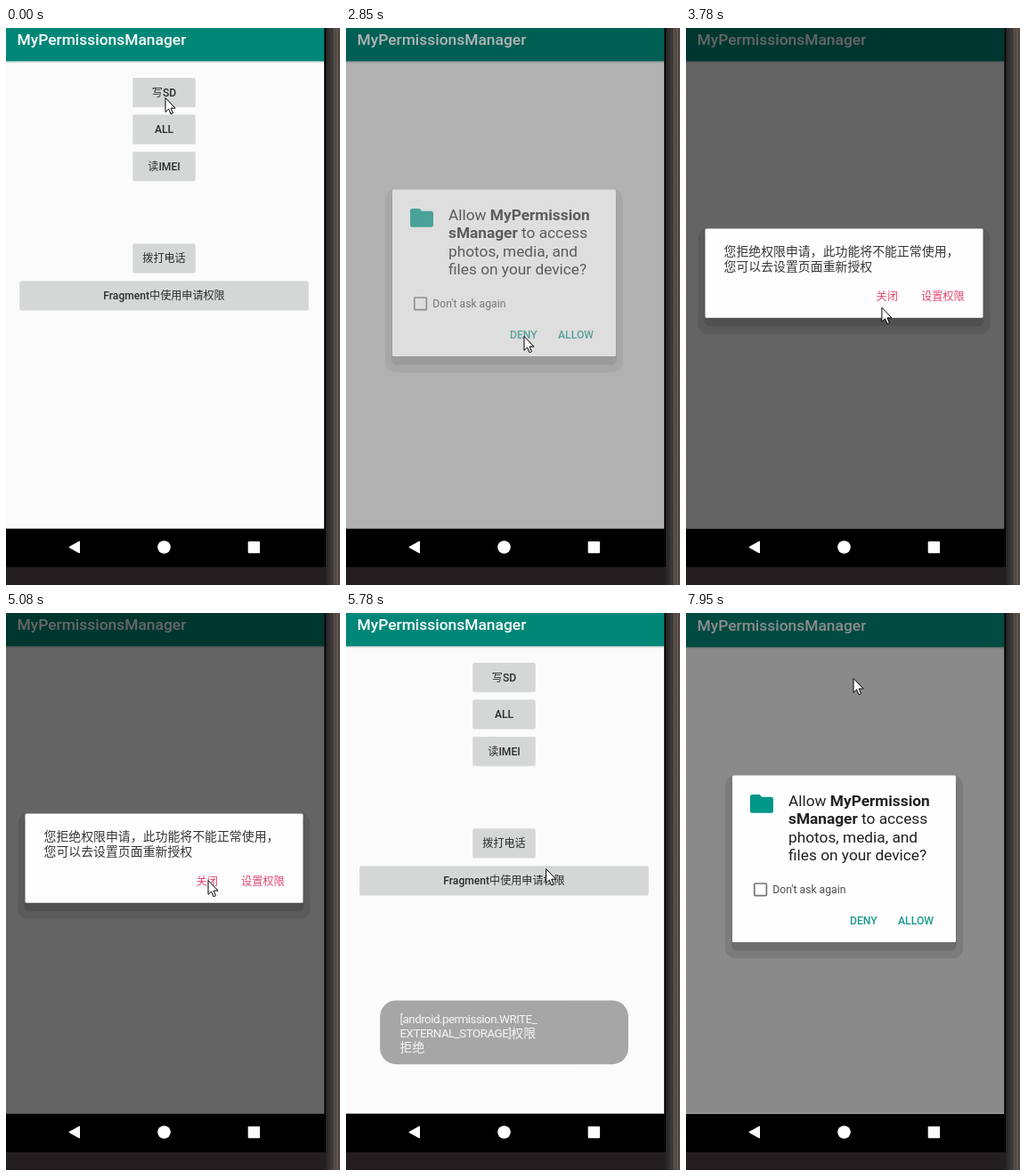
An HTML page that plays this animation: 375x626 px, repeating every 8 s.

```html
<!DOCTYPE html>
<html lang="zh-CN">
<head>
<meta charset="utf-8">
<title>Permission dialogs</title>
<style>
  html, body { margin: 0; width: 100%; height: 100%; overflow: hidden; background: #231f20; }
  svg { display: block; width: 100%; height: 100%; }
  text { font-family: Roboto, 'Noto Sans CJK SC', 'Noto Sans CJK', sans-serif; white-space: pre; }
  .cjk { font-weight: 400; }
  .mid { text-anchor: middle; }
  .toast { letter-spacing: -.52px; }
  .toast .cjk { font-size: 13.9px; letter-spacing: 0; }
</style>
</head>
<body>
<svg id="stage" viewBox="0 0 375 626" preserveAspectRatio="none"></svg>
<script>
const rect = (x, y, w, h, fill, r = 0, extra = '') =>
  `<rect x="${x}" y="${y}" width="${w}" height="${h}" rx="${r}" fill="${fill}" ${extra}/>`;

const text = (x, y, size, fill, str, weight = 400, extra = '') =>
  `<text x="${x}" y="${y}" font-size="${size}" fill="${fill}" font-weight="${weight}" ${extra}>` +
  str.replace(/[\u4e00-\u9fff\uff0c]+/g, s => `<tspan class="cjk">${s}</tspan>`) + '</text>';

const lines = (x, y, step, size, fill, rows, extra) =>
  rows.map((row, i) => text(x, y + i * step, size, fill, row, 400, extra)).join('');

const bold = s => `<tspan font-weight="700">${s}</tspan>`;

const button = (x, y, w, label) =>
  rect(x - .5, y, w + 1, 33.3, '#000', 2, 'opacity=".08"') +
  rect(x, y, w, 32.5, '#d5d7d6', 1.5) +
  text(x + w / 2, y + 20.5, 12.1, '#2b2d2c', label, 500, 'class="mid"');

// Stepped shadow with the white card on top
const card = (x, y, w, h) =>
  rect(x - 8, y, w + 16, h + 18, '#000', 11, 'opacity=".1"') +
  rect(x - 1, y + 3, w + 2, h + 6.5, '#000', 6, 'opacity=".12"') +
  rect(x, y, w, h, '#fefefe', 1.5);

const page =
  rect(0, 0, 357.5, 562.6, '#fafbfa') +
  rect(0, 37, 357.5, 2.2, '#000', 0, 'opacity=".1"') +
  rect(0, -4, 357.5, 41.4, '#008778') +
  text(12.5, 19, 17.4, '#fff', 'MyPermissionsManager', 500);

const buttons =
  ['写SD', 'ALL', '读IMEI'].map((s, i) => button(142.5, 56 + i * 41.6, 70, s)).join('') +
  button(142.5, 242.5, 70, '拨打电话') +
  button(15.5, 284.5, 324, 'Fragment中使用申请权限') +
  '<g clip-path="url(#btn)"><circle id="ripple" cx="182" cy="76" opacity=".1"/></g>';

const ask = card(52, 181.5, 251, 187.5) +
  '<path d="M74.5 203h8l2.8 2.8h10.2q2.5 0 2.5 2.5v13q0 2.5-2.5 2.5h-21q-2.5 0-2.5-2.5v-15.8q0-2.5 2.5-2.5z" fill="#009688"/>' +
  lines(115, 216, 20.4, 17.3, '#212121', [`Allow ${bold('MyPermission')}`,
    `${bold('sManager')} to access`, 'photos, media, and', 'files on your device?']) +
  rect(76.8, 303, 13.6, 13.6, 'none', 1, 'stroke="#757575" stroke-width="1.7"') +
  text(97.3, 314.3, 12.2, '#4c4c4c', "Don't ask again") +
  text(184, 349.3, 12.2, '#1a998b', 'DENY', 500) +
  text(238, 349.3, 12.2, '#1a998b', 'ALLOW', 500);

const denied = card(21.5, 225.5, 312, 100.2) +
  lines(42.5, 256, 16.5, 13.9, '#363636',
    ['您拒绝权限申请，此功能将不能正常使用，', '您可以去设置页面重新授权']) +
  text(213.5, 305.7, 12.2, '#e2476f', '关闭') +
  text(264, 305.7, 12.2, '#e2476f', '设置权限');

const toast = rect(38.2, 435.5, 278.8, 71.7, '#646464', 18) +
  lines(60.5, 460.5, 16.4, 13.4, '#f0f0f0',
    ['[android.permission.WRITE_', 'EXTERNAL_STORAGE]权限', '拒绝'], 'class="toast"');

const frame =
  rect(0, 563, 357.5, 43, '#000') +
  '<path d="M70.8 583.5L82.5 577V590Z" fill="#fff" stroke="#fff" stroke-linejoin="round"/>' +
  '<circle cx="177.5" cy="583.5" r="7.3" fill="#fff"/>' +
  rect(271.7, 577, 13.4, 13.2, '#fff', 1.2) +
  rect(0, 606, 375, 20, '#231f20') +
  rect(357.5, 0, 17.5, 626, 'url(#edge)') +
  rect(357.5, 0, 1.5, 606, '#000') +
  [366, 370, 373].map(x => rect(x, 0, 1, 626, '#1d1815', 0, 'opacity=".35"')).join('');

const edge = ['#1f1c1d', '#2b2829', '#383435', '#514a46', '#645a53', '#564d46']
  .map((c, i, all) => `<stop offset="${i / (all.length - 1)}" stop-color="${c}"/>`).join('');

const stage = document.getElementById('stage');
stage.innerHTML =
  `<defs><linearGradient id="edge">${edge}</linearGradient>
   <clipPath id="btn">${rect(142.5, 56, 70, 32.5, '#000', 1.5)}</clipPath></defs>
   <g id="page">${page}</g><g id="buttons">${buttons}</g><g id="toast">${toast}</g>
   ${rect(0, 0, 357.5, 562.8, '#000', 0, 'id="dim"')}
   <g id="ask">${ask}</g><g id="denied">${denied}</g>${frame}
   <path id="cursor" d="M.5.5V16.4L4.1 13 6.6 18.8 9 17.7 6.6 12.1H11.6Z" fill="#fff" stroke="#000"/>`;

const el = {};
for (const node of stage.querySelectorAll('[id]')) el[node.id] = node;
const set = (id, name, value) => el[id].setAttribute(name, value);

const LOOP = 8000;
const STEP = 125;           // fades advance in steps
const SAMPLE = 400 / 3;     // the pointer is seen 7.5 times a second

const ASK = 730, DENY = 2730, WARN = 3120, CLOSE = 5390, BACK = 5660, ASK_AGAIN = 7950;

const clamp = v => Math.min(1, Math.max(0, v));
const easeOut = p => 1 - (1 - p) ** 2;
const smooth = p => p * p * (3 - 2 * p);

// Eased 0..1 progress in steps, the first one visible at once
const fade = (t, start, ms) =>
  easeOut(clamp((Math.floor((t - start) / STEP) + 1) * STEP / ms));

const shown = (t, from, to, inMs = 250, outMs = 420) =>
  fade(t, from, inMs) - fade(t, to, outMs);

// Pointer: start ms, end ms, x, y
const moves = [
  [1235, 1400, 208.5, 236], [1400, 1790, 211, 347], [1940, 2180, 199.5, 346],
  [3270, 4050, 226, 303], [4320, 4570, 260, 298], [4680, 4990, 226.5, 300],
  [5660, 6590, 186, 78], [6590, 6730, 185.5, 75.5], [7150, 7410, 187.5, 73]
];

function pointer(t) {
  let x = 178.5, y = 78;
  for (const [start, end, toX, toY] of moves) {
    const p = smooth(clamp((t - start) / (end - start)));
    x += (toX - x) * p;
    y += (toY - y) * p;
  }
  return [x, y];
}

function draw(t) {
  const again = t >= ASK_AGAIN;
  const askIn = again ? shown(t, ASK_AGAIN, LOOP) : shown(t, ASK, DENY);
  const warnIn = shown(t, WARN, CLOSE);
  const opacity = amount => clamp(2 * amount - .4);

  set('dim', 'opacity', .6 * Math.max(askIn, warnIn));
  set('ask', 'opacity', opacity(askIn));
  set('denied', 'opacity', opacity(warnIn));
  set('toast', 'opacity', again ? 0 : shown(t, BACK, BACK + 1900, 375, 375));
  set('buttons', 'opacity', t < ASK || (t >= BACK && !again) ? 1 : 0);

  // A new screen settles by one pixel
  const sinceOpen = t - (again ? ASK_AGAIN : ASK);
  const move = `translate(0 ${sinceOpen >= 0 && sinceOpen < STEP ? 1 : 0})`;
  set('page', 'transform', move);
  set('ask', 'transform', move);

  const press = t - (t < BACK ? 310 : 7410);
  set('ripple', 'r', press < 0 ? 0 : 60 * fade(press, 0, 375));

  const seen = (Math.floor(t / SAMPLE - .3) + .47) * SAMPLE;
  set('cursor', 'transform', `translate(${pointer(seen).join(' ')})`);
}

const begin = performance.now();
function tick() {
  draw((performance.now() - begin) % LOOP);
  requestAnimationFrame(tick);
}
tick();
</script>
</body>
</html>
```
